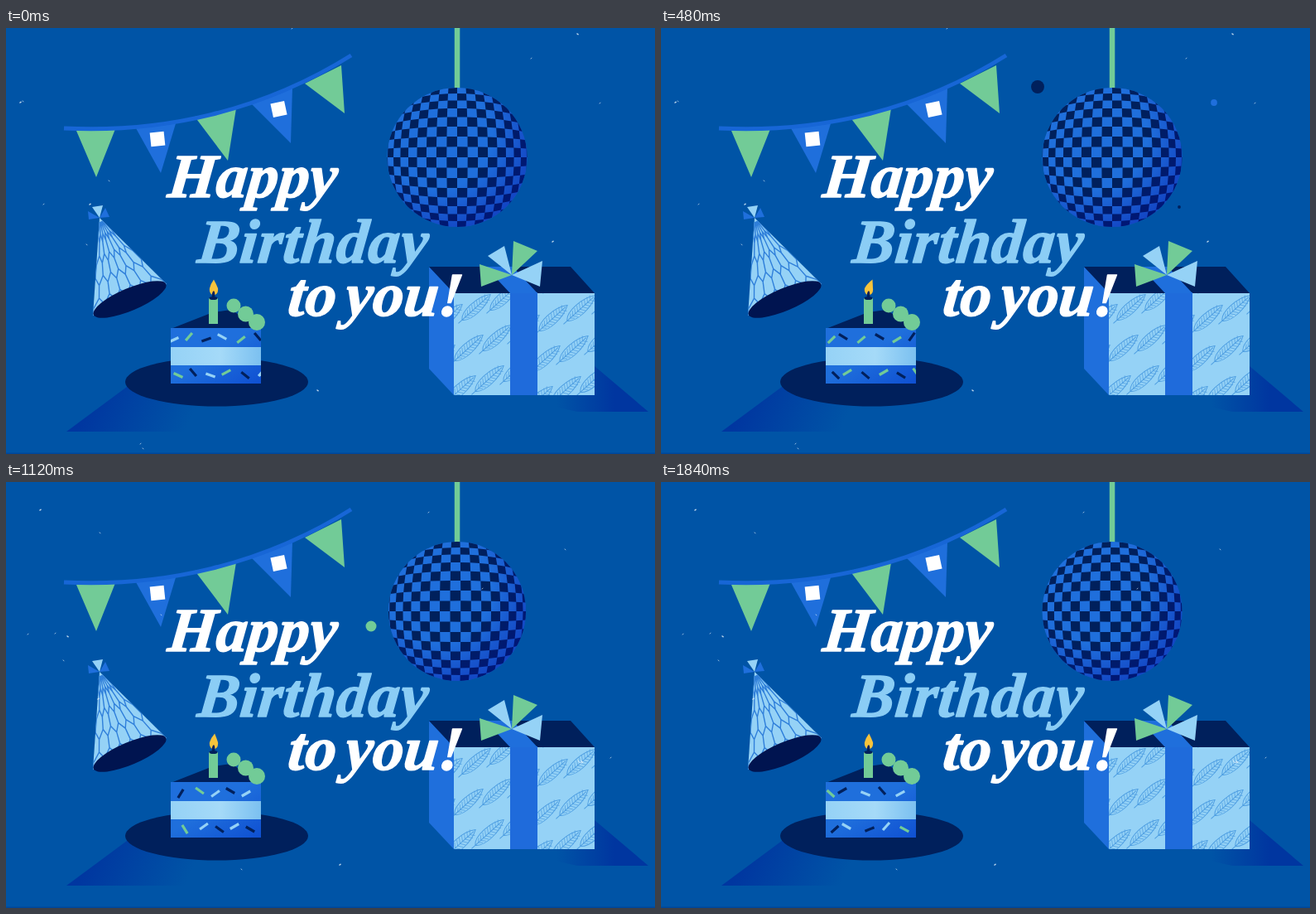
An HTML page for the animation above (1.92 s loop, 784x514 px).

```html
<!DOCTYPE html>
<html lang="en">
<head>
<meta charset="utf-8">
<title>Happy Birthday</title>
<style>
html, body { margin: 0; width: 100%; height: 100%; overflow: hidden; background: #0054a6; }
svg { display: block; width: 100vw; height: 100vh; }
.navy { fill: #00205c; }
.blue { fill: #1f6fdc; }
.sky { fill: #95d2f6; }
.green { fill: #72cb97; }
.title { font: italic bold 75px "Liberation Serif", "Times New Roman", serif; stroke-width: 1.5; stroke-linejoin: round; }
</style>
</head>
<body>
<svg viewBox="0 0 784 514">
  <defs>
    <linearGradient id="deep" x1="0" y1="0" x2="1" y2="1">
      <stop offset=".45" stop-color="#1f6fdc"/><stop offset="1" stop-color="#0f50d2"/>
    </linearGradient>
    <linearGradient id="bandLight">
      <stop offset="0" stop-color="#95d2f6"/><stop offset=".55" stop-color="#a5daf8"/><stop offset="1" stop-color="#7bc0f0"/>
    </linearGradient>
    <linearGradient id="plateShade" gradientUnits="userSpaceOnUse" x1="105" y1="440" x2="215" y2="490">
      <stop offset="0" stop-color="#0036a0"/><stop offset="1" stop-color="#0036a0" stop-opacity="0"/>
    </linearGradient>
    <linearGradient id="boxShade" gradientUnits="userSpaceOnUse" x1="735" x2="665">
      <stop offset="0" stop-color="#0036a0"/><stop offset="1" stop-color="#0036a0" stop-opacity="0"/>
    </linearGradient>
    <radialGradient id="ballShade" cx=".36" cy=".34" r=".78">
      <stop offset=".5" stop-color="#0008a0" stop-opacity="0"/><stop offset="1" stop-color="#0008a0" stop-opacity=".5"/>
    </radialGradient>
    <clipPath id="ballClip"><ellipse class="globe" cx="545" cy="156" ry="84"/></clipPath>
    <clipPath id="panelClip"><path d="M541 320H609V443H541ZM642 320H711V443H642Z"/></clipPath>
    <clipPath id="coneClip"><path d="M113 229L194 309L105 347Z"/></clipPath>
    <clipPath id="cakeClip"><path d="M199 362H308V385H199ZM199 407H308V429H199Z"/></clipPath>
    <g id="feather" fill="none" stroke="#4f9fe2" stroke-width="1">
      <path d="M-23 0C-17 -9 10 -9 23 0C10 8 -15 9 -23 0ZM-29 0H20"/>
      <path id="barbs" stroke-width=".7"/>
    </g>
  </defs>

  <rect width="784" height="514" fill="#0054a6"/>
  <rect y="512.5" width="784" height="1.5" fill="#00479a"/>

  <!-- bunting -->
  <path class="green" d="M85 124L132 122L109 180ZM228 107L278 97L268 160ZM361 67L405 45L409 103Z"/>
  <path class="blue" d="M157 121L206 112L187 175ZM297 92L346 71L344 139Z"/>
  <path d="M70 121C190 127 310 100 417 33" fill="none" stroke="#1766d6" stroke-width="5"/>
  <g fill="#fff">
    <rect x="-8.5" y="-8.5" width="17" height="17" transform="translate(183 134)rotate(-6)"/>
    <rect x="-8.5" y="-8.5" width="17" height="17" transform="translate(329.500 98)rotate(-12)"/>
  </g>

  <!-- mirror ball -->
  <rect class="green" x="541.800" width="6.500" height="73"/>
  <ellipse class="globe blue" cx="545" cy="156" ry="84"/>
  <g clip-path="url(#ballClip)"><path id="checks" class="navy"/></g>
  <ellipse class="globe" cx="545" cy="156" ry="84" fill="url(#ballShade)"/>
  <g id="dots"></g>

  <!-- party hat -->
  <path class="sky" d="M113 229L194 309L105 347Z"/>
  <path id="honeycomb" clip-path="url(#coneClip)" fill="none" stroke="#2f7fda" stroke-width="1.4"/>
  <ellipse rx="47.500" ry="13.500" transform="translate(149.500 327.500)rotate(-23)" fill="#001450"/>
  <path class="blue" d="M113 229L99 221L100 231ZM113 229L120 217L125 228Z"/>
  <path class="sky" d="M113 229L104 216L117 214Z"/>

  <!-- cake -->
  <path d="M73 487L150 430L345 445L295 487Z" fill="url(#plateShade)"/>
  <ellipse class="navy" cx="254.500" cy="427" rx="110.500" ry="29.500"/>
  <path class="navy" d="M199 363L250 343L272 340L308 363Z"/>
  <rect x="199" y="362" width="109" height="67" fill="url(#deep)"/>
  <rect x="199" y="385" width="109" height="22" fill="url(#bandLight)"/>
  <g id="sprinkles" clip-path="url(#cakeClip)" stroke-width="3.2"></g>
  <g class="green">
    <circle cx="275" cy="335" r="8.500"/><circle cx="289.500" cy="345" r="9.500"/><circle cx="303" cy="355" r="10"/>
    <rect x="245" y="326" width="11" height="31"/>
  </g>
  <ellipse class="navy" cx="250.500" cy="326" rx="5" ry="2"/>
  <path id="flame" fill="#f6c33c"/>
  <path class="navy" d="M249 326Q248 319 251 317Q253 319 252 326Z"/>

  <!-- gift -->
  <path d="M711 408L776 463H690L600 443H711Z" fill="url(#boxShade)"/>
  <path class="blue" d="M511 288L541 319V443L511 411Z"/>
  <path class="navy" d="M511 288H682L711 320H541Z"/>
  <rect class="sky" x="541" y="320" width="170" height="123"/>
  <g id="feathers" clip-path="url(#panelClip)"></g>
  <rect x="609" y="319" width="33" height="124" fill="#1f6bdb"/>
  <path class="blue" d="M579 288H612L642 320H609Z"/>
  <path class="green" d="M572 285L574 312L611 298ZM613 257L642 269L611 298Z"/>
  <path class="sky" d="M582 275L602 263L611 298ZM648 281L645 312L611 298Z"/>

  <g class="title">
    <text transform="translate(194 204)skewX(-6)" fill="#fff" stroke="#fff">Happy</text>
    <text transform="translate(230 283)skewX(-6)" fill="#8bcdf5" stroke="#8bcdf5" letter-spacing="1">Birthday</text>
    <text transform="translate(339 347)skewX(-6)" fill="#fff" stroke="#fff" word-spacing="-8">to you!</text>
  </g>
  <g id="specks" fill="none" stroke="#e4f1fa" stroke-linecap="round" opacity=".85"></g>
</svg>
<script>
const LOOP = 1920, STEP = 80, HALF = LOOP / 2;
const $ = id => document.getElementById(id);
const add = (parent, tag, attrs) => {
  const el = document.createElementNS('http://www.w3.org/2000/svg', tag);
  for (const key in attrs) el.setAttribute(key, attrs[key]);
  return parent.appendChild(el);
};
const NAVY = '#00205c', SKY = '#95d2f6', GREEN = '#72cb97', BLUE = '#1f6fdc';

// x, y, peak radius, first and last moment, colour
const dots = [
  [455, 71, 8, 160, 760, NAVY],
  [668, 90, 7.5, 400, 860, BLUE],
  [626, 216, 9.4, 440, 1060, NAVY],
  [682, 186, 7, 570, 1100, GREEN],
  [422, 121, 7, 720, 1090, BLUE],
  [441, 174, 7.5, 940, 1480, GREEN]
].map(([cx, cy, peak, from, to, fill]) =>
  ({ peak, from, to, el: add($('dots'), 'circle', { cx, cy, fill }) }));

// Each pose: sprinkle x positions, tilts and colours for both cake layers
const poses = [
  { x: [203, 221, 242, 261, 284, 304], tilt: [-25, -50, -20, 28, -38, 50], ink: [SKY, GREEN, NAVY, SKY, GREEN, NAVY] },
  { x: [206, 220, 242, 264, 285, 303], tilt: [-45, 32, -40, 30, -32, -55], ink: [GREEN, NAVY, GREEN, NAVY, GREEN, NAVY] },
  { x: [211, 234, 253, 271, 290], tilt: [-58, 35, -35, 30, -30], ink: [NAVY, GREEN, SKY, NAVY, SKY] },
  { x: [205, 219, 247, 267, 289], tilt: [42, -30, 22, 48, -28], ink: [GREEN, NAVY, SKY, NAVY, SKY] }
].map(({ x, tilt, ink }) => {
  const group = add($('sprinkles'), 'g', {});
  [374, 417].forEach((y, row) => x.forEach((cx, i) => add(group, 'path', {
    d: 'M-6 0H6',
    stroke: ink[(i + row) % ink.length],
    transform: `translate(${cx + row * 5} ${y + (i % 2 ? -1.5 : 2)})rotate(${row ? -tilt[i] : tilt[i]})`
  })));
  return group;
});

const specks = [
  [17, 90, 20, 88, 345, 1, 690, 7, 634, 37, 124, 184, 101, 213, 97, 261, 45, 213, 376, 437, 162, 502, 165, 507, 660, 258, 692, 347, 717, 91],
  [41, 34, 113, 61, 59, 183, 74, 186, 26, 184, 69, 215, 111, 262, 187, 160, 575, 129, 695, 337, 730, 333, 284, 467, 403, 462, 675, 81, 510, 37]
].map(list => {
  const group = add($('specks'), 'g', {});
  for (let i = 0; i < list.length; i += 2)
    add(group, 'path', { d: `M${list[i]} ${list[i + 1]}l1 ${i % 4 ? .7 : -.7}`, 'stroke-width': i % 3 ? .8 : 1.5 });
  return group;
});
add(specks[1], 'path', { d: 'M691 336q3 5 6 2' });

function drawPatterns() {
  let barbs = '';
  for (let x = -18; x < 18; x += 4) {
    const w = 6 * Math.sqrt(1 - (x / 23) ** 2);
    barbs += `M${x} 0l4 ${-w}M${x} 0l4 ${w}`;
  }
  $('barbs').setAttribute('d', barbs);
  for (let i = -5; i < 6; i++)
    for (let j = -6; j < 8; j++)
      add($('feathers'), 'use', {
        href: '#feather',
        transform: `translate(${568 + 25 * i + 34 * j} ${337 + 37 * i - 12 * j})rotate(-42)`
      });

  const cols = 6, rows = 4.5;
  const onCone = (u, v) => {
    u /= cols; v /= rows;
    return `${113 + v * (-8 + 89 * u)} ${229 + v * (118 - 38 * u)}`;
  };
  let comb = '';
  for (let r = 0; r < rows + 1; r++)
    for (let c = -1; c <= cols; c++) {
      const u = c + r % 2 / 2, end = onCone(u, r + .8);
      comb += `M${onCone(u, r + .2)}L${end}L${onCone(u - .5, r + 1.2)}M${end}L${onCone(u + .5, r + 1.2)}`;
    }
  $('honeycomb').setAttribute('d', comb);
}

// A flat checkerboard bulged into a ball; the outer columns drop away before new ones arrive
function drawBall(phase) {
  const squeeze = phase > .08 && phase < .38 ? 7 * ((phase - .08) / .27) ** 1.4 : 0;
  const rx = 84.5 - squeeze, bulge = Math.PI / 3, half = 8;
  document.querySelectorAll('.globe').forEach(el => el.setAttribute('rx', rx));
  const point = (col, row) => {
    const r = Math.hypot(col, row) / half || 1e-6;
    const scale = 84 * Math.sin(bulge * Math.min(r, 1.45)) / (Math.sin(bulge) * r * half);
    return `${(545 + col * scale).toFixed(1)} ${(156 + row * scale).toFixed(1)}`;
  };
  let d = '';
  for (let row = -half; row < half; row++)
    for (let i = -half - 3; i < half + 1; i++) {
      if ((row + i) % 2 === 0) continue;
      const col = i + 2 * phase;
      d += `M${point(col, row)}L${point(col + 1, row)}L${point(col + 1, row + 1)}L${point(col, row + 1)}Z`;
    }
  $('checks').setAttribute('d', d);
}

function render(time) {
  const t = Math.floor(time % LOOP / STEP) * STEP;
  const phase = t % HALF / HALF;
  drawBall(phase);

  const lean = 4.5 * Math.sin(Math.PI * phase) ** 2;
  const tip = 251 + lean;
  $('flame').setAttribute('d',
    `M${tip} 303.500Q${254 + lean * .4} 309 256 314Q257 321 251 322.500Q245 321 246 314Q${247 + lean * .3} 309 ${tip} 303.500Z`);

  for (const { peak, from, to, el } of dots) {
    const life = (t - from) / (to - from);
    el.setAttribute('r', life > 0 && life < 1 ? peak * Math.sin(Math.PI * life) : 0);
  }
  const show = (groups, index) =>
    groups.forEach((g, i) => g.setAttribute('visibility', i === index ? 'visible' : 'hidden'));
  show(poses, Math.floor(t / 480));
  show(specks, Math.floor(t / HALF));
}

drawPatterns();
const start = performance.now();
function tick() {
  render(performance.now() - start);
  requestAnimationFrame(tick);
}
tick();
</script>
</body>
</html>
```
